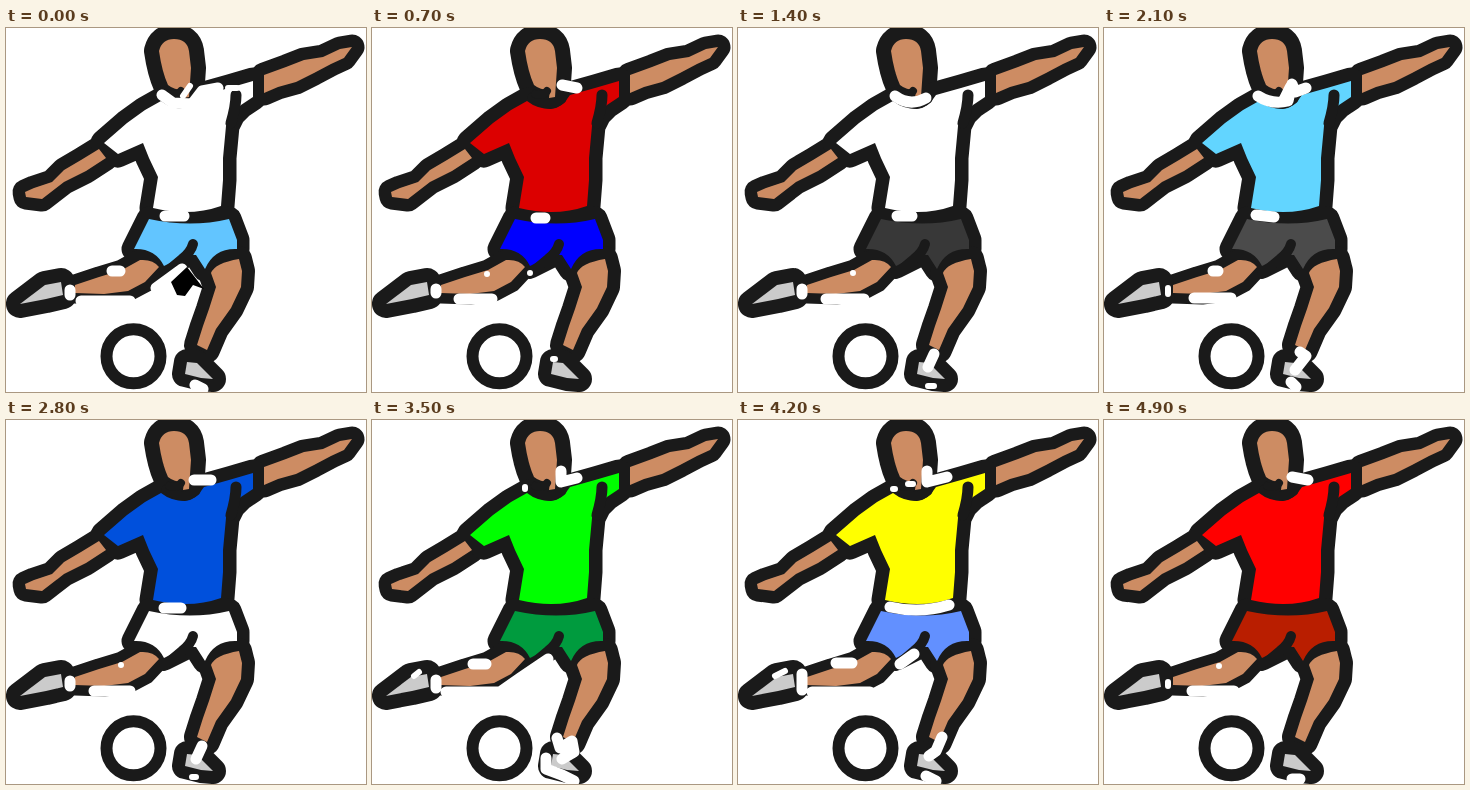
An HTML page for the animation above (5600 ms loop, 360 by 364 pixels).

```html
<!DOCTYPE html>
<html lang="en">
<head>
<meta charset="utf-8">
<title>Football kits</title>
<style>
  html, body { margin: 0; height: 100%; overflow: hidden; background: #fff; }
  svg { display: block; width: 360px; height: 364px; }
</style>
</head>
<body>
<svg viewBox="0 0 360 364">
  <g id="outline" fill="#1a1a1a" stroke="#1a1a1a" stroke-linejoin="round"></g>
  <g id="fills"></g>
  <g fill="none" stroke="#1a1a1a" stroke-linecap="round" stroke-linejoin="round">
    <path d="M160 69Q177 82 190 71" stroke-width="9"/>
    <path d="M163 66Q171 69 175 63" stroke-width="8"/>
    <path d="M230 67Q230 78 225 95" stroke-width="11"/>
    <path d="M187 216Q185 224 176 231L158 246" stroke-width="10"/>
    <circle cx="127.5" cy="328.3" r="27" stroke-width="12"/>
  </g>
  <path id="gaps" fill="none" stroke="#fff" stroke-width="11" stroke-linecap="round" stroke-linejoin="round"/>
  <path id="dots" fill="none" stroke="#fff" stroke-width="6" stroke-linecap="round"/>
  <path id="blot"/>
</svg>
<script>
const SKIN = '#cd8c63', SHOE = '#cbcbcb', FRAME_MS = 700;

// kind, outline width, shape
const parts = [
  [SKIN, 30, 'M153 23Q156 11 168 11Q181 11 183 23L185 40L183 69L177 70L178 62Q168 62 162 57Q156 44 153 23Z'],
  [SKIN, 25, 'M258 47L280 39L298 32L317 29L334 21L346 19L338 30L325 36L308 45L290 54L272 59L258 65Z'],
  [SKIN, 25, 'M93 121L100 130L80 143L58 154L36 171L20 169L19 164L28 160L46 154L58 142L75 132Z'],
  ['shirt', 27, 'M155 73Q165 81 179 81Q190 80 198 67L223 60L247 53L247 69L235 77L226 86L220 98L217 130L217 152L215 178Q184 189 147 180L152 149L143 130L137 115L112 126L98 115L121 95L139 82Z'],
  ['shorts', 25, 'M143 191Q185 200 223 191L231 212L231 221Q208 220 199 241L190 227L180 227L158 238Q149 220 128 221Z'],
  [SKIN, 26, 'M205 245Q209 235 233 231L236 243L235 259L225 280L210 301L201 322L191 317L197 298L203 281L210 259Z'],
  [SKIN, 21, 'M69 257L93 249L116 242L134 232Q147 231 153 239L139 254L122 263L98 266L69 265Z'],
  [SHOE, 26, 'M181 334L191 335L207 351L195 350L179 346Z'],
  [SHOE, 28, 'M14 276L39 257L55 254L57 267L40 271Z']
];

// shirt, shorts, wide gaps, small gaps in the outline, black blot
const kits = [
  ['#fff', '#62c5ff',
    'M156 67L167 75L186 76L196 63L212 60M159 188H178M106 243H114M64 262V267M75 273H124M150 260L176 241M189 357L197 361',
    'M177 68L184 58M222 60H231',
    'M181 239L165 254L171 267L179 268L187 257L198 261Z'],
  ['#dc0000', '#0000ff',
    'M190 57L205 60M164 190H173M87 271H120M64 261V265',
    'M115 246H115M158 245H158M181 331H183'],
  ['#fff', '#383838',
    'M157 68Q172 79 188 70M159 188H174M88 271H126M64 261V266M196 326L190 339',
    'M115 245H115M190 358H196'],
  ['#62d5ff', '#4b4b4b',
    'M154 68Q168 77 184 73L188 56L191 64L202 60M152 187L170 189M109 243H114M90 270H127M196 324L202 328L191 342M187 354L192 359',
    'M64 260V266M177 72L184 58'],
  ['#0050dc', '#fff',
    'M188 60L205 60M158 188H175M88 271H124M64 261V266M196 326L190 339',
    'M115 245H115M186 357H190'],
  ['#00ff00', '#009b3e',
    'M189 51V62L205 58M101 244H114M64 260V268M74 272H128L148 258L176 239M185 318L188 328L200 321L202 332L190 339M174 338V349L190 355L202 361',
    'M153 67V69M42 256L47 252'],
  ['#ffff00', '#6290ff',
    'M189 51V62L209 57M152 187Q182 194 211 185M98 243H114M64 254V270M74 272H132M162 244L176 234M204 317L198 331L191 336M188 356L198 361',
    'M155 69H157M170 64H175M37 256L47 251'],
  ['#ff0000', '#b91e00',
    'M188 57L204 60M88 271H130M188 359H196',
    'M64 262V266M115 246H115']
];

const get = id => document.getElementById(id);
const addPath = (parent, attrs) => {
  const path = document.createElementNS('http://www.w3.org/2000/svg', 'path');
  for (const key in attrs) path.setAttribute(key, attrs[key]);
  return get(parent).appendChild(path);
};

const kitPaths = {};
for (const [kind, width, d] of parts) {
  addPath('outline', { d, 'stroke-width': width });
  kitPaths[kind] = addPath('fills', { d, fill: kind[0] === '#' ? kind : 'none' });
}

let shown = -1;
function draw() {
  const index = Math.floor(performance.now() / FRAME_MS) % kits.length;
  if (index !== shown) {
    const [shirt, shorts, gaps, dots, blot = ''] = kits[shown = index];
    kitPaths.shirt.setAttribute('fill', shirt);
    kitPaths.shorts.setAttribute('fill', shorts);
    get('gaps').setAttribute('d', gaps);
    get('dots').setAttribute('d', dots);
    get('blot').setAttribute('d', blot);
  }
  requestAnimationFrame(draw);
}
draw();
</script>
</body>
</html>
```
